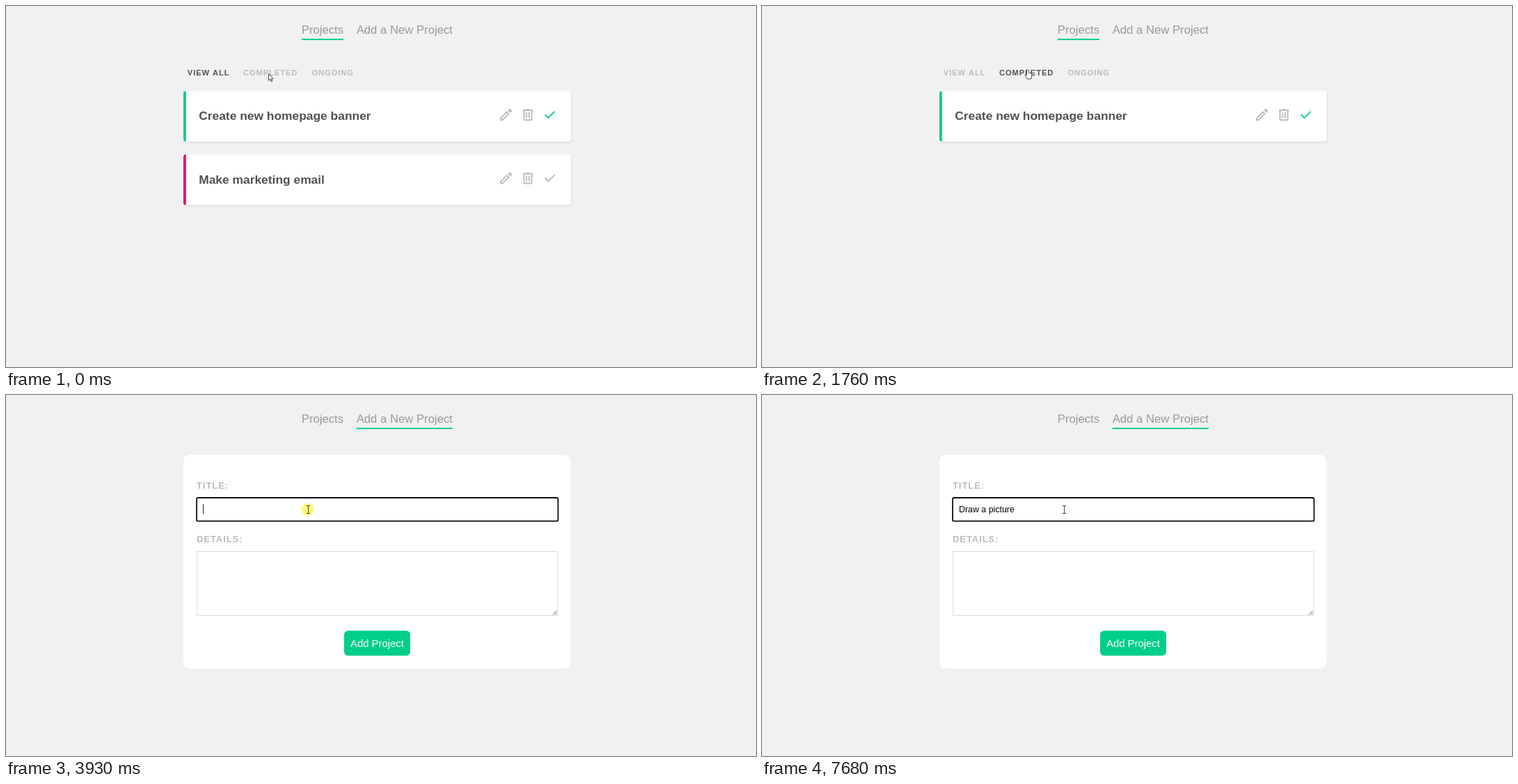
Recreate the animation shown at these times as an HTML page with a canvas. Size 1078 by 520 pixels, loop 8000 ms.

```html
<!DOCTYPE html>
<html lang="en">
<head>
<meta charset="utf-8">
<title>Project planner</title>
<style>
  html, body { margin: 0; width: 100%; height: 100%; overflow: hidden; background: #f1f1f1; }
  canvas { display: block; }
</style>
</head>
<body>
<canvas id="stage" width="1078" height="520"></canvas>
<script>
const ctx = document.getElementById('stage').getContext('2d');
const LOOP = 8000;
const GREEN = '#00ce89', PINK = '#e90074', PALE = '#bbb', DARK = '#515154';
const FAMILY = '"Liberation Sans", Arial, sans-serif';

const ICONS = {
  edit: new Path2D('M5 19h1.4l8.625-8.625-1.4-1.4L5 17.6V19ZM19.3 8.925l-4.25-4.2 1.4-1.4q.575-.575 1.413-.575t1.412.575l1.4 1.4q.575.575.6 1.388t-.55 1.387L19.3 8.925ZM17.85 10.4L7.25 21H3v-4.25l10.6-10.6 4.25 4.25Z'),
  bin: new Path2D('M7 21q-.825 0-1.413-.587T5 19V6H4V4h5V3h6v1h5v2h-1v13q0 .825-.587 1.413T17 21H7ZM17 6H7v13h10V6ZM9 17h2V8H9v9Zm4 0h2V8h-2v9Z'),
  done: new Path2D('M9.55 18l-5.7-5.7 1.425-1.425L9.55 15.15l9.175-9.175L20.15 7.4 9.55 18Z')
};
const POINTERS = {
  arrow: new Path2D('M.5 .5V10.4L2.7 8.4 4.3 12 5.8 11.3 4.3 7.8H7Z'),
  hand: new Path2D('M-1.4 1.5Q0 -.5 1.4 1.5V5.2Q3 4.5 3.8 5.8Q5.3 5.4 5.8 7V10Q5.5 12 4.5 14H-.7Q-2 11.4 -3.8 8.8Q-3.4 7 -1.4 8.6Z')
};

const PROJECTS = [
  { title: 'Create new homepage banner', complete: true },
  { title: 'Make marketing email', complete: false }
];
const FILTERS = [['VIEW ALL', 260.8], ['COMPLETED', 340.9], ['ONGOING', 439.5]];

// Pointer moves: start time, number of ticks, destination
const TICK = 68;
const MOVES = [
  [70, 1, 366, 95],
  [400, 5, 451, 96],
  [960, 1, 454, 97],
  [1230, 3, 382, 91],
  [1960, 3, 306, 92],
  [2630, 3, 526, 40],
  [3390, 8, 433.5, 165]
];
// Mouse button held down: from, to
const PRESSES = [[270, 340], [1090, 1160], [1630, 1760], [2300, 2370], [3050, 3190], [3930, 4060]];
const FILTER_TIMES = [[0, 0], [340, 1], [1160, 2], [1760, 1], [2370, 0]];
const FORM_TIME = 3190, FOCUS_TIME = 3930;
const TYPED = 'Draw a picture';
const KEY_TIMES = [4530, 4800, 4950, 5020, 5420, 5620, 5820, 6080, 6350, 6420, 6750, 6820, 7020, 7090];

const within = (t, [from, to]) => t >= from && t < to;

function text(str, x, y, size, color, bold = false, spacing = 0) {
  ctx.font = `${bold ? 'bold ' : ''}${size}px ${FAMILY}`;
  ctx.letterSpacing = spacing + 'px';
  ctx.fillStyle = color;
  ctx.fillText(str, x, y);
}

function box(x, y, w, h, r, fill) {
  ctx.beginPath();
  ctx.roundRect(x, y, w, h, r);
  ctx.fillStyle = fill;
  ctx.fill();
}

function rect(x, y, w, h, fill) {
  ctx.fillStyle = fill;
  ctx.fillRect(x, y, w, h);
}

function icon(name, cx, cy, color) {
  ctx.save();
  ctx.translate(cx, cy);
  ctx.scale(0.93, 0.93);
  ctx.translate(-12, -12);
  ctx.fillStyle = color;
  ctx.fill(ICONS[name]);
  ctx.restore();
}

function drawNav(onForm) {
  text('Projects', 424.8, 40, 16.7, '#999');
  text('Add a New Project', 503.7, 40, 16.7, '#999');
  if (onForm) rect(503.7, 47.2, 138.3, 1.9, GREEN);
  else rect(424.8, 47.2, 60.4, 1.9, GREEN);
}

function drawCard({ title, complete }, slot) {
  const y = 122.5 + slot * 91.3, h = 72.8;
  ctx.save();
  ctx.shadowColor = 'rgba(0,0,0,.08)';
  ctx.shadowOffsetX = 1;
  ctx.shadowOffsetY = 2;
  ctx.shadowBlur = 3;
  box(255, y, 557, h, 3.7, '#fff');
  ctx.restore();
  ctx.save();
  ctx.beginPath();
  ctx.roundRect(255, y, 557, h, 3.7);
  ctx.clip();
  rect(255, y, 3.8, h, complete ? GREEN : PINK);
  ctx.restore();
  text(title, 277.2, y + 41.9, 17.4, DARK, true);
  icon('edit', 718.4, y + 34.3, PALE);
  icon('bin', 750.1, y + 34.3, PALE);
  icon('done', 781.7, y + 34.3, complete ? GREEN : PALE);
}

function drawList(t) {
  const filter = FILTER_TIMES.filter(([at]) => t >= at).pop()[1];
  FILTERS.forEach(([label, x], i) =>
    text(label, x, 99.7, 11.16, i === filter ? DARK : PALE, true, 0.93));
  PROJECTS
    .filter(p => filter === 0 || p.complete === (filter === 1))
    .forEach(drawCard);
}

function drawForm(t) {
  box(255, 86, 556.5, 308, 9.3, '#fff');
  text('TITLE:', 274, 135.2, 13, PALE, true, 0.93);
  text('DETAILS:', 274, 212, 13, PALE, true, 0.93);

  if (t >= FOCUS_TIME) {
    ctx.beginPath();
    ctx.roundRect(274, 148, 519.5, 33.7, 2);
    ctx.strokeStyle = '#101010';
    ctx.lineWidth = 1.8;
    ctx.stroke();
  } else {
    rect(274, 181, 519.5, 1, '#ddd');
  }

  ctx.lineWidth = 1;
  ctx.strokeStyle = '#ddd';
  ctx.strokeRect(274.5, 225.5, 518.5, 92);
  ctx.strokeStyle = '#555';
  ctx.beginPath();
  ctx.moveTo(786, 316.5);
  ctx.lineTo(791.5, 311);
  ctx.moveTo(789.5, 316.5);
  ctx.lineTo(791.5, 314.5);
  ctx.stroke();

  box(486, 339.6, 95, 35.8, 5.6, GREEN);
  text('Add Project', 495, 363, 14.88, '#fff');
}

function drawTyping(t) {
  const str = TYPED.slice(0, KEY_TIMES.filter(at => t >= at).length);
  text(str, 283, 168.6, 12.4, '#000');
  const blinkedOff = within(t, [4460, 4530]) || t >= 7680;
  if (!blinkedOff) {
    rect(Math.floor(283 + ctx.measureText(str).width), 157.5, 1, 14, '#222');
  }
}

function pointerAt(t) {
  let x = 377, y = 97;
  for (const [start, ticks, toX, toY] of MOVES) {
    if (t < start) break;
    const k = Math.min(1, (Math.floor((t - start) / TICK) + 1) / ticks);
    const e = k * k * (3 - 2 * k);
    x += (toX - x) * e;
    y += (toY - y) * e;
  }
  return { x, y };
}

function pointerKind(t, { x, y }) {
  if (t < 70) return 'arrow';
  if (y < 50 && x > 500) return 'hand';
  if (t >= FORM_TIME) return y > 147 ? 'beam' : 'arrow';
  return y > 86 ? 'hand' : 'arrow';
}

function drawPointer(t) {
  const p = pointerAt(t), kind = pointerKind(t, p);
  ctx.save();
  ctx.translate(p.x, p.y);
  if (PRESSES.some(span => within(t, span))) {
    ctx.beginPath();
    ctx.arc(0, 0, 9, 0, Math.PI * 2);
    ctx.fillStyle = 'rgba(255,250,40,.65)';
    ctx.fill();
  }
  ctx.lineWidth = 1;
  ctx.strokeStyle = '#444';
  if (kind === 'beam') {
    ctx.translate(1, 0);
    ctx.stroke(new Path2D('M-2.5 -5.5H2.5M0 -5.5V5.5M-2.5 5.5H2.5'));
  } else {
    ctx.fillStyle = '#fff';
    ctx.fill(POINTERS[kind]);
    ctx.stroke(POINTERS[kind]);
  }
  ctx.restore();
}

function draw(t) {
  const onForm = t >= FORM_TIME;
  rect(0, 0, 1078, 520, '#f1f1f1');
  drawNav(onForm);
  if (onForm) drawForm(t);
  else drawList(t);
  if (t >= FOCUS_TIME) drawTyping(t);
  drawPointer(t);
}

let begin;
function loop(now) {
  begin ??= now;
  draw(Math.max(0, now - begin) % LOOP);
  requestAnimationFrame(loop);
}
draw(0);
requestAnimationFrame(loop);
</script>
</body>
</html>
```
